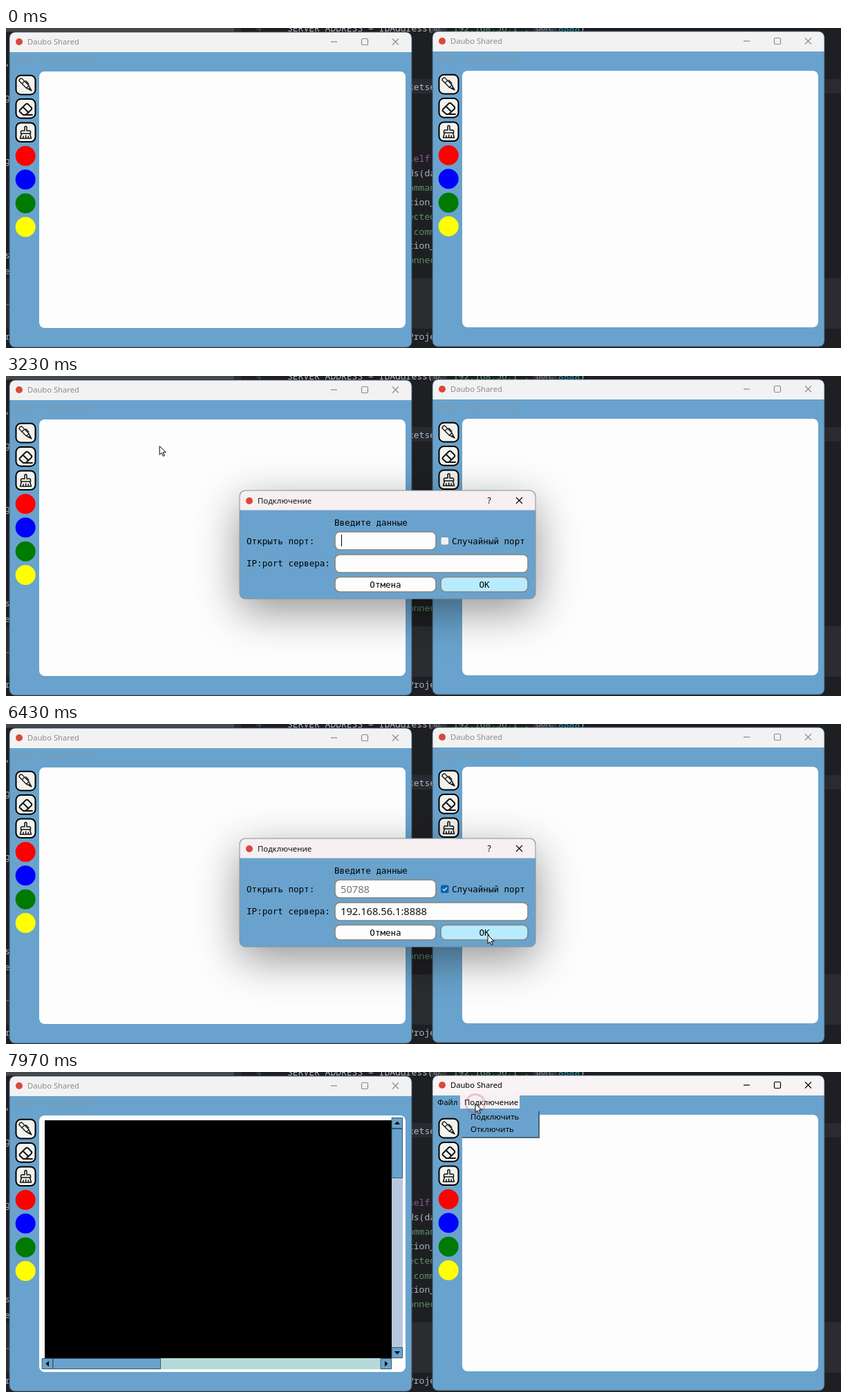
Write an HTML page with a canvas that moves like this. It is 1208 px wide and 464 px high and loops after 8 s.

```html
<!DOCTYPE html>
<html lang="ru">
<head>
<meta charset="utf-8">
<title>Daubo Shared</title>
<style>
html, body { margin: 0; width: 100%; height: 100%; overflow: hidden; background: #1e1f22; }
canvas { display: block; }
</style>
</head>
<body>
<canvas id="stage" width="1208" height="464"></canvas>
<script>
const c = document.getElementById('stage').getContext('2d');
const LOOP = 8000, BLUE = '#69a3cd';
const SANS = '"Noto Sans", "Open Sans", sans-serif';
const MONO = '"DejaVu Sans Mono", "Noto Sans Mono", monospace';
const CODE = '13px "Noto Sans Mono", "DejaVu Sans Mono", monospace';
const UI = '11.4px ' + SANS;
const LABEL = '12.55px ' + MONO;

// key moments in ms
const T = { menu: 230, choose: 2200, open: 2900, check: 3980, focus: 4430, paste: 5670, ok: 6440, close: 6600, menu2: 7730 };

// pointer: time, x, y
const path = [
  [30, 1168, 18], [110, 1085, 20], [270, 109, 67], [3050, 109, 67], [3650, 628, 226], [3980, 637, 237],
  [4130, 608, 264], [4430, 540, 272], [4570, 540, 272], [4800, 556, 287], [4970, 556, 287],
  [5170, 561, 311], [5450, 600, 318], [5770, 692, 322], [5830, 692, 322], [5910, 715, 333],
  [6000, 697, 306], [6700, 697, 306], [7230, 716, 200], [7700, 679, 46]
];
const clicks = [
  [T.choose, 109, 67], [T.check, 637, 237], [T.focus, 540, 272], [T.ok, 697, 306], [T.menu2, 679, 46]
];

const clamp = v => Math.max(0, Math.min(1, v));
const smooth = v => v * v * (3 - 2 * v);

function rect(x, y, w, h, fill) {
  c.fillStyle = fill;
  c.fillRect(x, y, w, h);
}
function box(x, y, w, h, r, fill, stroke, lw = 1) {
  c.beginPath();
  c.roundRect(x, y, w, h, r);
  if (fill) { c.fillStyle = fill; c.fill(); }
  if (stroke) { c.strokeStyle = stroke; c.lineWidth = lw; c.stroke(); }
}
function disc(x, y, r, fill) {
  c.beginPath();
  c.arc(x, y, r, 0, 7);
  c.fillStyle = fill;
  c.fill();
}
function text(s, x, y, font, fill, align = 'left') {
  c.font = font;
  c.fillStyle = fill;
  c.textAlign = align;
  c.fillText(s, x, y);
}
function draw(d, lw, stroke = '#111', fill) {
  const p = new Path2D(d);
  if (fill) { c.fillStyle = fill; c.fill(p); }
  c.strokeStyle = stroke;
  c.lineWidth = lw;
  c.stroke(p);
}

function editor() {
  rect(0, 0, 1208, 464, '#1e1f22');
  rect(0, 0, 340, 6, '#2b2d30');
  rect(0, 0, 330, 5, '#46484b');
  rect(370, 74, 838, 21, '#292b30');
  rect(0, 363, 1208, 73, '#2a2c2f');
  rect(0, 400, 6, 2, '#55585c');
  text('4', 362, 5, CODE, '#4b5059');
  text('SERVER_ADDRESS = IpAddress(', 407, 5, CODE, '#bcbec4');
  box(614, -8, 24, 15, 4, '#34363a');
  text('ip:', 618, 4, '11px ' + SANS, '#868a91');
  text('"192.168.56.1"', 639, 5, CODE, '#6aab73');
  text(',', 749, 5, CODE, '#bcbec4');
  box(763, -8, 34, 15, 4, '#34363a');
  text('port:', 767, 4, '11px ' + SANS, '#868a91');
  text('8888', 799, 5, CODE, '#2aacb8');
  text(')', 830, 5, CODE, '#bcbec4');
  const plain = '#a9b7c6', green = '#5c9164';
  [['ketse', 90, plain], ['self.', 194, '#94558d'], ['ds(da', 215, plain], ['omman', 236, green],
   ['tion_', 257, plain], ['ected', 278, green], [' comm', 300, green], ['tion_', 320, plain],
   ['onnec', 341, green], ['Proje', 452, plain]].forEach(([s, y, col]) => text(s, 582, y, CODE, col));
  [[',', 54], ['g', 105], ['g', 197], ['s', 334], ['es', 357], ['r', 452]]
    .forEach(([s, y]) => text(s, -2, y, CODE, plain));
}

function cross(x, y, col) {
  draw(`M${x - 4.5} ${y - 4.5}l9 9m0 -9l-9 9`, 1.1, col);
}

function tools() {
  for (let i = 0; i < 3; i++) box(14.5, 68.8 + i * 34.3, 28, 27.6, 7, '#f2f2ee', '#000', 2);
  c.lineJoin = c.lineCap = 'round';
  c.save();
  c.translate(28.5, 82.5);
  c.rotate(Math.PI / 4);
  draw('M-11 -2.6H4V2.6H-11Q-13 0 -11 -2.6ZM4 -2.6L12 0L4 2.6M-5 -2.6V2.6M-4 -4.2H2M6.5 0H12', 1.3);
  c.restore();
  draw('M20 119L28.5 110.5Q30.2 109 32 110.5L36.5 115Q38 116.7 36.5 118.5L28.5 126H25L20 121.5Q19 120.3 20 119ZM24.5 114.5L32.5 122.5M28 126H38', 2);
  draw('M27 149V143.5Q28.5 141.5 30 143.5V149H34Q35.5 149 35.5 150.5V153H21.5V150.5Q21.5 149 23 149ZM22.5 153L20.5 160H36.5L34.5 153M25 160V157M28.7 160V156M32.3 160V157', 1.5);
  ['#f00', '#00f', '#007a00', '#ff0'].forEach((col, i) => disc(28.2, 185.4 + i * 34.4, 14.5, col));
}

function scrollButton(x, y, w, h, arrow) {
  box(x + .5, y + .5, w - 1, h - 1, 0, BLUE, '#36566e');
  if (!arrow) return;
  c.save();
  c.translate(x + w / 2, y + h / 2);
  c.rotate(arrow * Math.PI / 2);
  c.beginPath();
  c.moveTo(-4, 2); c.lineTo(4, 2); c.lineTo(0, -2.5);
  c.fillStyle = '#000';
  c.fill();
  c.restore();
}

function picture() {
  rect(56, 70, 502, 345, '#000');
  rect(558, 66, 16, 349, '#b7c8de');
  rect(52, 415, 506, 16, '#b5d9d8');
  scrollButton(558, 66, 16, 16, 4);
  scrollButton(558, 82, 16, 72);
  scrollButton(558, 399, 16, 16, 2);
  scrollButton(52, 415, 16, 16, 3);
  scrollButton(68, 415, 156, 16);
  scrollButton(542, 415, 16, 16, 1);
}

// laid out in left-window coordinates
function appWindow(dx, dy, w, { active, menu, hover, filled }) {
  const right = 5 + w, ink = active ? '#000' : '#8b8b8b', menuInk = active ? '#000' : '#8498a9';
  c.save();
  c.translate(dx, dy);
  box(5, 6, w, 457, 8, BLUE, '#3f5260');
  box(5.5, 6.5, w - 1, 28.5, [8, 8, 0, 0], active ? '#f8f3f4' : '#f3f2f2');
  disc(19, 20, 5, '#d9483b');
  text('Daubo Shared', 31, 24, '11.2px ' + SANS, ink);
  if (hover) rect(right - 90, 7, 45, 27, '#ebebec');
  draw(`M${right - 117} 20h9`, 1.2, hover ? '#000' : ink);
  box(right - 72.5, 15.5, 9, 9, 1.5, null, ink, 1.2);
  cross(right - 23.5, 20, ink);
  if (menu) rect(45, 35, 86, 19, '#f5f1f2');
  text('Файл', 12, 49, UI, menuInk);
  text('Подключение', 51, 49, UI, menuInk);
  tools();
  box(48, 63, w - 52, 372, 8, '#fdfdfd');
  if (filled) picture();
  if (menu) {
    rect(48, 58, 112, 39, '#4c6577');
    rect(45, 55, 113, 40, BLUE);
    text('Подключить', 60, 69.5, UI, '#000');
    text('Отключить', 60, 87.5, UI, '#000');
  }
  c.restore();
}

function caret(x, y) {
  rect(x, y, 1, 17, '#000');
}

function dialog(t) {
  if (t < T.open || t > T.close + 190) return;
  const shown = clamp((t - T.open + 20) / 270), gone = clamp((t - T.close) / 150);
  const scale = 1 - .18 * (1 - shown) ** 1.03 - .07 * gone;
  const alpha = t < T.close ? clamp(shown) : 1 - gone;
  if (alpha <= 0) return;
  c.save();
  c.globalAlpha = alpha;
  c.translate(484, 215);
  c.scale(scale, scale);
  c.translate(-484, -215);
  c.save();
  c.beginPath();
  c.rect(0, 0, 1208, 600);
  c.roundRect(338, 166, 428, 157, 8);
  c.clip('evenodd');
  c.shadowColor = 'rgba(0,0,0,.42)';
  c.shadowBlur = 62;
  c.shadowOffsetY = 18;
  box(338, 166, 428, 157, 8, '#000');
  c.restore();

  box(338, 166, 428, 157, 8, BLUE, '#82909a');
  box(338.5, 166.5, 427, 28, [8, 8, 0, 0], '#f8eff0');
  disc(352, 181, 5, '#d9483b');
  text('Подключение', 364, 185, UI, '#111');
  text('?', 699, 185, '12px ' + SANS, '#000', 'center');
  cross(742.5, 180.5, '#000');

  text('Введите данные', 475, 216.5, LABEL, '#000');
  text('Открыть порт:', 348, 243.5, LABEL, '#000');
  text('IP:port сервера:', 348, 276, LABEL, '#000');
  text('Случайный порт', 645, 243.5, LABEL, '#000');
  const edge = '#85857d';
  box(476, 226, 146, 26, 7, '#fdfdfd', edge, 1.6);
  box(476, 259, 279, 26, 7, '#fdfdfd', edge, 1.6);
  box(476, 291.5, 146, 21.5, 7, '#fdfdfd', edge, 1.6);
  box(629, 291.5, 126, 21.5, 7, '#b9ebff', edge, 1.6);
  text('Отмена', 549, 306.5, LABEL, '#000', 'center');
  text('OK', 692, 306.5, LABEL, '#000', 'center');

  const checked = t >= T.check, field = '14.7px ' + SANS;
  box(629, 233.5, 11.5, 11.5, 2.5, !checked ? '#eef3f7' : t < 4230 ? '#b4bccb' : '#0b62b4', checked ? null : '#8a949c');
  if (checked) {
    draw('M631.8 239.3l2.2 2.2l4 -4.3', 1.2, '#fff');
    text('50788', 484, 244.5, field, '#777');
  } else if ((t - T.open) % 1060 < 530) caret(485, 230);
  const typed = t >= T.paste;
  if (typed) text('192.168.56.1:8888', 484, 277, field, '#111');
  const since = t - (typed ? T.paste : T.focus);
  if (since >= 0 && since % 1060 < 530) caret(typed ? 614 : 485, 263);
  c.restore();
}

function ripple(t, [start, x, y]) {
  const age = t - start;
  if (age < 0 || age > 330) return;
  const r = 5 + 10 * clamp(age / 220);
  c.save();
  c.globalAlpha = .9 * (1 - age / 330);
  c.beginPath();
  c.arc(x, y, r - 1.5, 0, 7);
  c.fillStyle = `rgba(230,50,50,${.9 * clamp(1 - age / 130)})`;
  c.fill();
  c.strokeStyle = '#c93545';
  c.lineWidth = 3;
  c.stroke();
  c.restore();
}

function pointer(t) {
  if (t < path[0][0]) return;
  let i = path.findIndex(p => p[0] > t);
  if (i < 0) i = path.length;
  const a = path[i - 1], b = path[i] || a;
  const k = b === a ? 0 : smooth((t - a[0]) / (b[0] - a[0]));
  const x = a[1] + (b[1] - a[1]) * k, y = a[2] + (b[2] - a[2]) * k;
  c.save();
  c.translate(x, y);
  c.lineCap = 'butt';
  const overField = t > 3200 && t < T.close && x > 476 && x < 755 && y > 259 && y < 285;
  if (overField) draw('M-2.5 -6H2.5M0 -6V6M-2.5 6H2.5', 1.1, '#222');
  else draw('M0 0V12.5L3 9.8L5.2 14.6L7.2 13.7L5 9H9.2Z', 1, '#000', '#fff');
  c.restore();
}

function render(t) {
  const firstMenu = t >= T.menu && t < T.choose;
  const secondMenu = t >= T.menu2;
  editor();
  appWindow(0, 0, 582, {
    active: firstMenu || (t >= T.close && !secondMenu),
    menu: firstMenu,
    filled: t >= T.close
  });
  appWindow(612, -1, 567, {
    active: secondMenu,
    menu: secondMenu,
    hover: t >= 110 && t < T.choose + 60
  });
  dialog(t);
  clicks.forEach(p => ripple(t, p));
  pointer(t);
}

const begin = performance.now();
function tick(now) {
  render(Math.max(0, now - begin) % LOOP);
  requestAnimationFrame(tick);
}
render(0);
requestAnimationFrame(tick);
</script>
</body>
</html>
```
